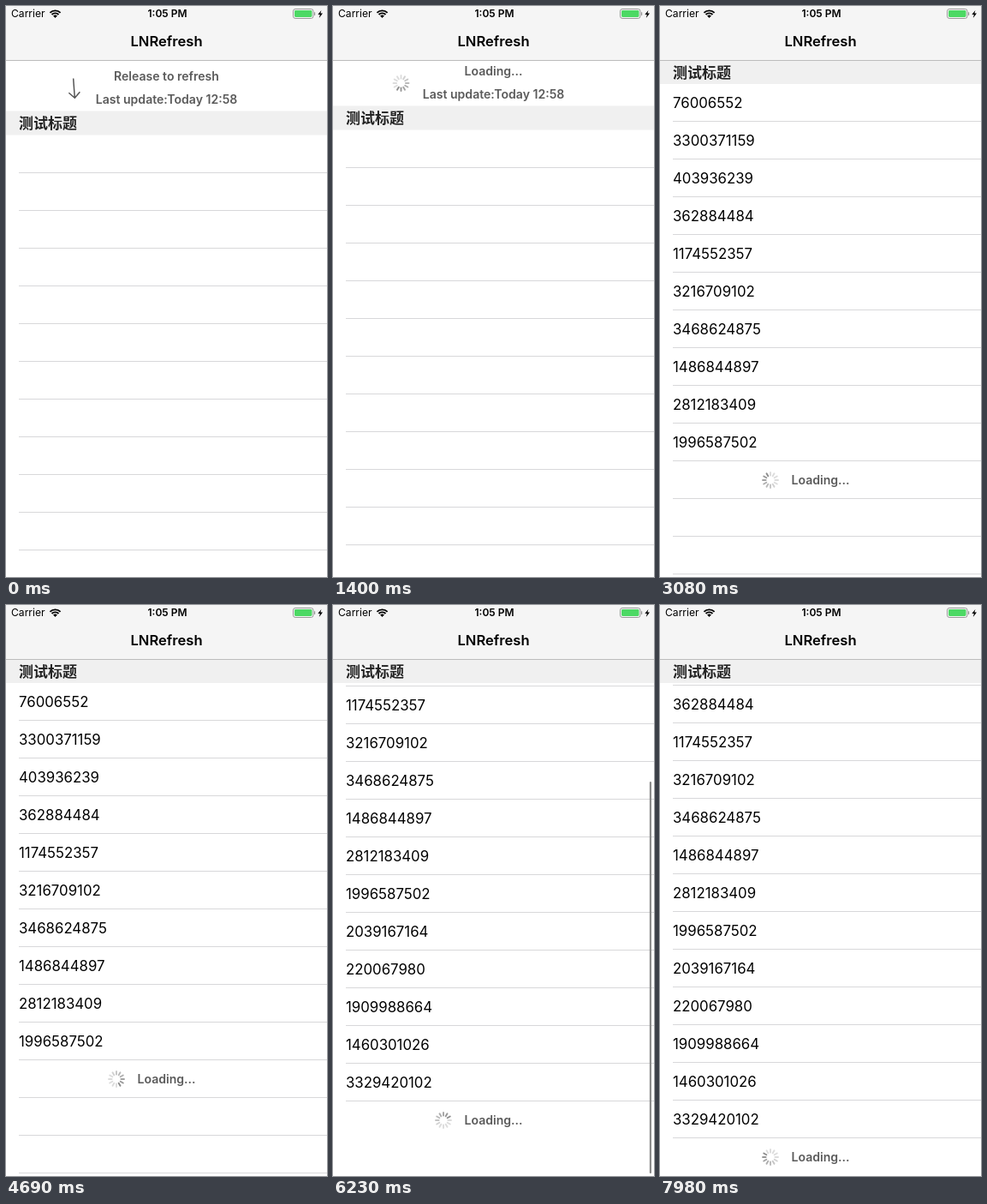
An HTML page with a canvas that plays this animation: 375 px wide and 666 px high, repeating every 8000 ms.

```html
<!DOCTYPE html>
<html lang="en">
<head>
<meta charset="utf-8">
<title>LNRefresh</title>
<style>
html, body { margin: 0; width: 100%; height: 100%; overflow: hidden; background: #fff; }
canvas { display: block; width: 375px; height: 666px; }
</style>
</head>
<body>
<canvas></canvas>
<script>
const W = 375, H = 666, LOOP = 8000;
const NAV = 63, HEAD = 28, ROW = 44, PULL = 54, MAX_SCROLL = 129;
const GRAY = '#5a5a5a';
const LABEL = '600 14.05px Inter, sans-serif';
const rows = ['76006552', '3300371159', '403936239', '362884484', '1174552357',
  '3216709102', '3468624875', '1486844897', '2812183409', '1996587502',
  '2039167164', '220067980', '1909988664', '1460301026', '3329420102'];

// When things happen, in ms
const RELEASED = 350, REFRESHED = 1750, MORE = 2800, MORE_DONE = 5250, MORE_AGAIN = 5930;

// Content offset below the navigation bar: [time, offset]
const path = [[0, 60], [RELEASED, 85], [840, PULL], [1760, PULL], [2450, 0],
  [5430, 0], [6160, -173], [6900, -MAX_SCROLL], [LOOP, -MAX_SCROLL]];

const canvas = document.querySelector('canvas');
const c = canvas.getContext('2d');
const dpr = window.devicePixelRatio || 1;
canvas.width = W * dpr;
canvas.height = H * dpr;

const clamp = x => Math.max(0, Math.min(1, x));
const ramp = (t, from, to) => clamp((t - from) / (to - from));
const smooth = x => x * x * (3 - 2 * x);

function offsetAt(t) {
  const i = path.findIndex(p => p[0] > t);
  const [t0, a] = path[i - 1], [t1, b] = path[i];
  return Math.round(a + (b - a) * smooth(ramp(t, t0, t1)));
}

function rect(x, y, w, h, color) {
  c.fillStyle = color;
  c.fillRect(x, y, w, h);
}

function text(s, x, y, font, color = '#000', align = 'left') {
  c.font = font;
  c.fillStyle = color;
  c.textAlign = align;
  c.textBaseline = 'alphabetic';
  c.fillText(s, x, y);
}

const label = (s, y) => text(s, 187.5, y + 5, LABEL, GRAY, 'center');

function spinner(x, y, t, phase, alpha = 1) {
  const head = Math.floor(t / 89.4) + phase;
  c.save();
  c.translate(x, y);
  c.lineWidth = 1.9;
  c.lineCap = 'round';
  c.strokeStyle = '#8c8c8c';
  for (let i = 0; i < 12; i++) {
    const age = (head - i + 120) % 12;
    c.globalAlpha = alpha * Math.max(0.3, 1 - age * 0.1);
    c.beginPath();
    c.moveTo(0, -5.4);
    c.lineTo(0, -9);
    c.stroke();
    c.rotate(Math.PI / 6);
  }
  c.restore();
}

function arrow(x, y, angle) {
  c.save();
  c.translate(x, y);
  c.rotate(angle);
  c.lineWidth = 1.5;
  c.strokeStyle = '#555';
  c.beginPath();
  c.moveTo(0, -11.5);
  c.lineTo(0, 11);
  c.moveTo(-6.5, 4.8);
  c.lineTo(0, 11.3);
  c.lineTo(6.5, 4.8);
  c.stroke();
  c.restore();
}

function pullHeader(t, top) {
  const done = t >= REFRESHED;
  label(t < RELEASED ? 'Release to refresh' : done ? 'Pull down to refresh' : 'Loading...', top - 41);
  label('Last update:Today ' + (done ? '13:05' : '12:58'), top - 14);
  if (t < RELEASED) arrow(79.5, top - 27, -Math.PI * smooth(ramp(t, -30, 310)));
  else spinner(79.5, top - 27, t, 4, 1 - ramp(t, 1760, 2450) * 0.7);
}

function list(t, top) {
  const count = t < REFRESHED ? 0 : t < MORE_DONE ? 10 : 15;
  const first = top + HEAD;
  c.save();
  c.beginPath();
  c.rect(0, NAV, W, H);
  c.clip();
  for (let k = 1; k <= (count === 15 ? 15 : 16); k++)
    rect(15, first + k * ROW - 1, 360, 1, '#d8d8da');
  rows.slice(0, count).forEach((s, k) =>
    text(s, 15, first + k * ROW + 27.8, '16.8px Inter, sans-serif'));
  if (count) {
    const y = first + count * ROW + 22;
    const again = t >= MORE_AGAIN;
    const loading = t >= MORE && t < MORE_DONE || again;
    label(loading ? 'Loading...' : 'Tap or pull up to load more', y);
    if (loading) spinner(129, y, t, again ? 5 : 1);
  }
  const y = Math.max(NAV, top - 0.5);
  rect(0, y, W, HEAD, '#f0f0f0');
  text('测试标题', 15, y + 20.6, '700 17px "Noto Sans CJK SC", "Noto Sans CJK", sans-serif', '#222');
  c.restore();
}

function scrollBar(t, scroll) {
  const alpha = ramp(t, 5430, 5500) * (1 - ramp(t, 6900, 7070));
  if (!alpha) return;
  const over = Math.max(0, scroll - MAX_SCROLL);
  c.globalAlpha = alpha;
  c.fillStyle = '#8a8a8a';
  c.beginPath();
  c.roundRect(369.8, 66 + 97 * clamp(scroll / MAX_SCROLL) + over, 2.2, 500 - over, 1.1);
  c.fill();
  c.globalAlpha = 1;
}

function wifi(x, y) {
  c.strokeStyle = c.fillStyle = '#000';
  c.lineWidth = 1.9;
  c.lineCap = 'butt';
  const a = -Math.PI * 0.75, b = -Math.PI * 0.25;
  for (const r of [8.6, 5.6]) {
    c.beginPath();
    c.arc(x, y, r, a, b);
    c.stroke();
  }
  c.beginPath();
  c.moveTo(x, y);
  c.arc(x, y, 3.4, a, b);
  c.fill();
}

function battery() {
  c.lineWidth = 1;
  c.strokeStyle = '#999';
  c.beginPath();
  c.roundRect(335.5, 3.5, 23.5, 11, 2.6);
  c.stroke();
  c.fillStyle = '#4cd964';
  c.beginPath();
  c.roundRect(337, 5, 20.5, 8, 1.4);
  c.fill();
  rect(360, 7.3, 1.2, 3.6, '#999');
  c.fillStyle = '#000';
  c.beginPath();
  [[368.4, 5], [364.3, 10], [366.8, 10], [365.8, 14], [370, 8.6], [367.4, 8.6]]
    .forEach(p => c.lineTo(...p));
  c.fill();
}

function navBar() {
  rect(0, 0, W, NAV, 'rgba(245,245,245,.93)');
  rect(0, NAV, W, 1, '#bcbcbc');
  text('Carrier', 6, 13.3, '12.1px Inter, sans-serif');
  wifi(57.5, 14);
  text('1:05 PM', 188.5, 13.3, '600 12px Inter, sans-serif', '#000', 'center');
  battery();
  text('LNRefresh', 187.5, 47, '600 16.6px Inter, sans-serif', '#000', 'center');
}

function draw(now) {
  const t = now % LOOP;
  const offset = offsetAt(t), top = NAV + offset;
  c.setTransform(dpr, 0, 0, dpr, 0, 0);
  rect(0, 0, W, H, '#fff');
  if (offset > 0) pullHeader(t, top);
  list(t, top);
  scrollBar(t, -offset);
  navBar();
  requestAnimationFrame(draw);
}
requestAnimationFrame(draw);
</script>
</body>
</html>
```
